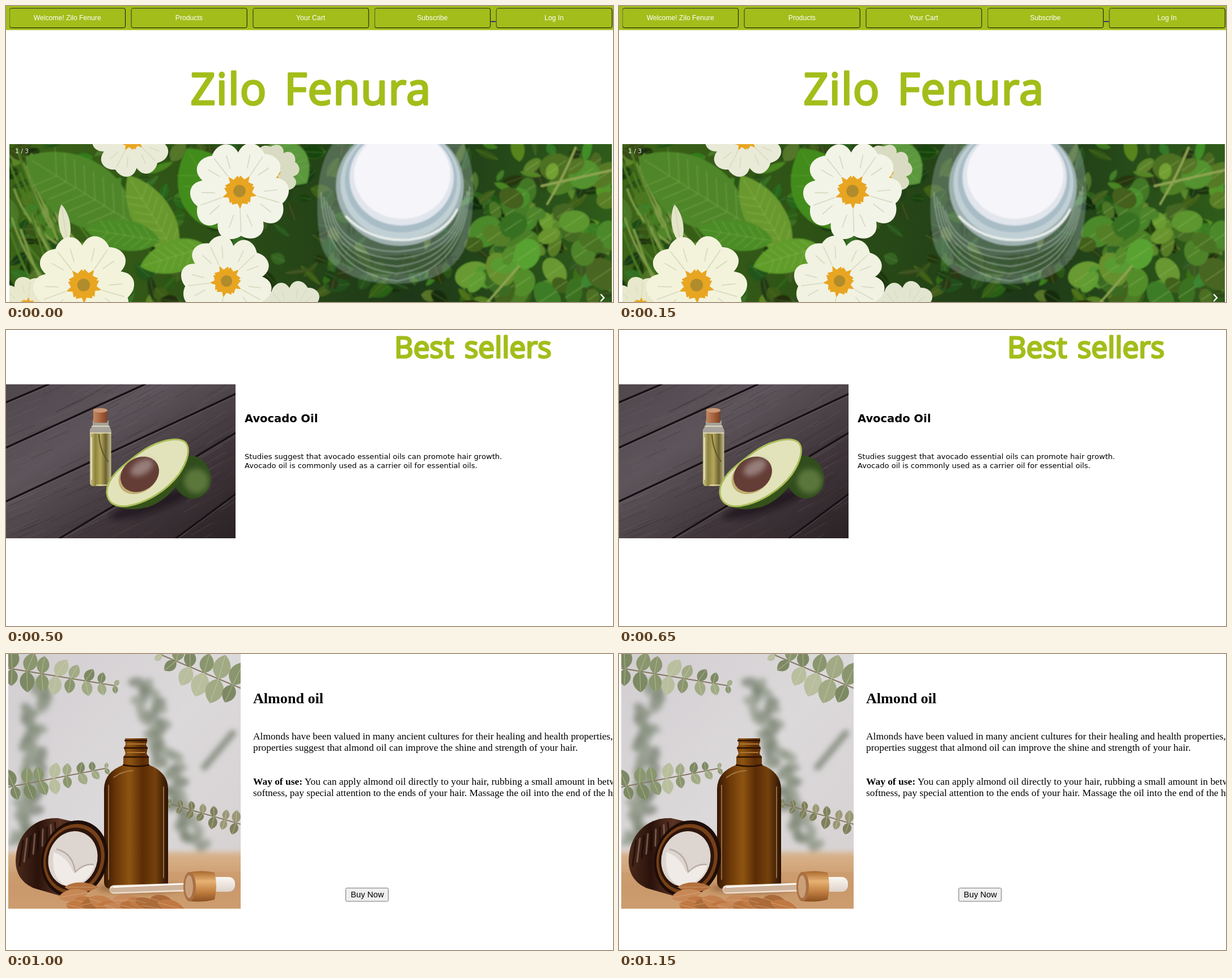
An HTML page that plays this animation: 1071 by 523 pixels, repeating every 1.25 s.

```html
<!DOCTYPE html>
<html lang="en">
<head>
<meta charset="utf-8">
<title>Shop tour</title>
<style>
html, body { margin: 0; width: 100%; height: 100%; overflow: hidden; background: #fff; }
#stage { display: block; width: 1071px; height: 523px; }
.sans { font-family: "Liberation Sans", Arial, sans-serif; }
.wide { font-family: "DejaVu Sans", Verdana, sans-serif; font-size: 13.1px; }
.serif { font-family: "Liberation Serif", "Times New Roman", serif; font-size: 17.4px; }
.brand { font-family: "Open Sans", sans-serif; fill: #a3bd1a; stroke: #a3bd1a; stroke-linejoin: round; text-anchor: middle; }
.mid { text-anchor: middle; }
</style>
</head>
<body>
<svg id="stage" viewBox="0 0 1071 523">
  <defs>
    <filter id="soft" x="-20%" y="-20%" width="140%" height="140%"><feGaussianBlur stdDeviation="1"/></filter>
    <filter id="blur" x="-50%" y="-50%" width="200%" height="200%"><feGaussianBlur stdDeviation="5"/></filter>
    <filter id="haze" x="-100%" y="-100%" width="300%" height="300%"><feGaussianBlur stdDeviation="30"/></filter>
  </defs>
</svg>
<script>
const stage = document.getElementById('stage');
const defs = stage.querySelector('defs');
const HOLD = 250, TAU = Math.PI * 2;

function el(parent, tag, attrs = {}, text) {
  const node = document.createElementNS('http://www.w3.org/2000/svg', tag);
  for (const k in attrs) node.setAttribute(k, attrs[k]);
  if (text) node.textContent = text;
  return parent.appendChild(node);
}
const rect = (g, x, y, width, height, fill, more) => el(g, 'rect', { x, y, width, height, fill, ...more });
const oval = (g, cx, cy, rx, ry, fill, turn = 0, more) =>
  el(g, 'ellipse', { cx, cy, rx, ry, fill, transform: `rotate(${turn} ${cx} ${cy})`, ...more });
const shape = (g, d, fill, more) => el(g, 'path', { d, fill, ...more });
const line = (g, d, stroke, width, more) =>
  el(g, 'path', { d, fill: 'none', stroke, 'stroke-width': width, 'stroke-linecap': 'round', ...more });
const label = (g, x, y, text, cls, more) => el(g, 'text', { x, y, class: cls, ...more }, text);
const group = (g, more) => el(g, 'g', more);
const blurred = (g, id) => group(g, { filter: `url(#${id})` });

let ids = 0;
function gradient(colors, dx = 1, dy = 0) {
  const id = 'g' + ids++;
  const lg = el(defs, 'linearGradient', { id, x2: dx, y2: dy });
  colors.forEach((c, i) => el(lg, 'stop', { offset: i / (colors.length - 1), 'stop-color': c }));
  return `url(#${id})`;
}

// Seeded generator of numbers between a and b
function random(seed) {
  return (a = 0, b = 1) => {
    seed = (seed * 1664525 + 1013904223) >>> 0;
    return a + (b - a) * seed / 4294967296;
  };
}

// A box in stage coordinates that clips what is drawn in it
function photo(g, x, y, width, height, fill) {
  const box = el(g, 'svg', { x, y, width, height, viewBox: [x, y, width, height].join(' ') });
  rect(box, x, y, width, height, fill);
  return box;
}

// Leaf growing from x, y at an angle in radians
function leaf(g, x, y, angle, len, w, fill, vein, sides = 0) {
  const c = w * 0.667;
  const f = group(g, { transform: `translate(${x} ${y}) rotate(${angle * 360 / TAU})` });
  shape(f, `M0 0C${len * 0.2} ${c} ${len * 0.72} ${c} ${len} 0C${len * 0.72} ${-c} ${len * 0.2} ${-c} 0 0`, fill);
  if (!vein) return;
  let d = `M0 0H${len * 0.94}`;
  for (let i = 1; i <= sides; i++) {
    const t = i / (sides + 1) * 0.8 * len, tip = t + len * 0.13;
    d += `M${tip} ${w * 0.36}L${t} 0L${tip} ${-w * 0.36}`;
  }
  line(f, d, vein, 1, { opacity: 0.6 });
}

// Stem from tip to base with leaf pairs that open from the tip down
function branch(g, [x1, y1], [x2, y2], o) {
  const rnd = random(o.n * 7), cx = (x1 + x2) / 2 + o.bend, cy = (y1 + y2) / 2;
  const up = Math.atan2(y1 - y2, x1 - x2);
  line(g, `M${x1} ${y1}Q${cx} ${cy} ${x2} ${y2}`, o.stem, o.thick || 2);
  for (let i = 0; i < o.n; i++) {
    const t = i / o.n, s = 1 - t;
    const x = s * s * x1 + 2 * s * t * cx + t * t * x2, y = s * s * y1 + 2 * s * t * cy + t * t * y2;
    const len = o.small + (o.large - o.small) * Math.sin(Math.min(1, t * 1.7) * Math.PI / 2);
    for (const side of [-1, 1]) {
      const size = len * rnd(0.8, 1.1), turn = o.open + o.fold * t + rnd(-0.25, 0.25);
      leaf(g, x, y, up + side * turn, size, size * o.wide, o.fills[Math.floor(rnd(0, o.fills.length))], o.vein, o.sides);
    }
  }
}

function primrose(g, x, y, r, turn, shade) {
  const f = group(g, { transform: `translate(${x} ${y}) rotate(${turn}) scale(${r})` });
  const each = draw => [0, 72, 144, 216, 288].forEach(a => draw(group(f, { transform: `rotate(${a})` })));
  each(p => {
    shape(p, 'M.06 0C.22 -.12 .4 -.52 .78 -.48C1 -.45 1.07 -.2 .94 0C1.07 .2 1 .45 .78 .48C.4 .52 .22 .12 .06 0', shade);
    line(p, 'M.4 0H.86M.5 -.14L.75 -.24M.5 .14L.75 .24', '#d6d9bf', 0.02);
  });
  each(p => shape(p, 'M0 -.14L.28 -.17L.26 -.05L.38 0L.26 .05L.28 .17L0 .14', '#e8a521'));
  oval(f, 0, 0, 0.13, 0.13, '#b08c2c');
}

function title(g, x, y) {
  label(g, x, y, 'Zilo Fenura', 'brand', { 'font-size': 77, 'stroke-width': 3.5, 'letter-spacing': 1.5, 'word-spacing': 9 });
}
const counter = (g, x, y, text) => label(g, x, y, text, 'wide', { style: 'font-size:10.7px', fill: '#f2f2f2' });
const heading = (g, x, y, text) => label(g, x, y, text, 'wide', { style: 'font-size:19.5px', 'font-weight': 700 });

function jar(p) {
  const g = blurred(p, 'soft');
  shape(g, 'M576 244C545 285 546 365 554 415C565 470 630 492 690 491C760 490 808 460 818 400C828 340 829 285 808 244Z', '#9db2b0', { opacity: 0.38 });
  shape(g, 'M575 410Q620 445 695 440Q775 435 805 395Q795 455 735 470Q650 485 595 455Z', '#2a4a20', { opacity: 0.55 });
  for (let i = 0; i < 5; i++)
    line(g, `M${556 + i * 5} ${330 + i * 8}Q${560 + i * 8} ${468 - i * 9} 690 ${486 - i * 13}Q${812 - i * 5} ${464 - i * 9} ${818 - i * 4} ${320 + i * 8}`,
      '#c6d5d0', 2, { opacity: 0.5 });
  ['#9fb1b0', '#c1d0d5', '#a9bdc7', '#e1e5ec', '#f6f5fa'].forEach((c, i) =>
    oval(g, 695 + i, 318 - i * 5, 113 - i * 7, 106 - i * 7, c));
  line(g, 'M600 372Q645 418 712 413Q774 405 796 360', '#e9efed', 4);
}

function home(g) {
  rect(g, 0, 0, 1071, 42.5, '#a3bd1a');
  ['Welcome! Zilo Fenure', 'Products', 'Your Cart', 'Subscribe', 'Log In'].forEach((text, i) => {
    const x = 6.5 + i * 214.7;
    rect(g, x, 4, 204, 34.5, 'none', { rx: 3, stroke: '#111' });
    line(g, `M${x} 36V7Q${x} 4 ${x + 3} 4H${x + 201}`, '#6d7a2c', 1);
    label(g, x + 101.7, 25, text, 'sans mid', { 'font-size': 12.2, fill: '#fff' });
  });
  line(g, 'M856 27.5H863.5', '#0a0a8c', 1.5);
  title(g, 538, 173.5);

  const p = photo(g, 6, 244, 1063, 279, gradient(['#3d6418', '#2c5016', '#1d3818', '#2f5c1a']));
  const rnd = random(11), back = blurred(p, 'soft');
  for (let i = 0; i < 420; i++) {
    const x = rnd(0, 1069), y = rnd(235, 525), edge = Math.abs(x - 540) / 540;
    leaf(back, x, y, rnd(0, TAU), rnd(18, 52), rnd(10, 28),
      `hsl(${rnd(82, 112)} ${rnd(45, 65)}% ${rnd(10, 25 + edge * 15)}%)`, '#5c8b3a');
  }
  for (let i = 0; i < 24; i++) {
    const x = rnd(0, 80), y = rnd(240, 420);
    line(back, `M${x} ${y}q20 60 ${rnd(40, 75)} ${rnd(90, 130)}`, i % 2 ? '#7b9a45' : '#4a7a24', 4);
  }
  for (let i = 0; i < 60; i++) {
    const x = rnd(810, 1069), y = rnd(270, 520), r = rnd(14, 32), fill = `hsl(${rnd(84, 105)} 52% ${rnd(24, 42)}%)`;
    oval(back, x, y, r, r * rnd(0.55, 0.9), fill, rnd(0, 180));
    line(back, `M${x - r * 0.6} ${y + r * 0.4}Q${x} ${y} ${x + r * 0.6} ${y - r * 0.4}`, '#9fc564', 1, { opacity: 0.7 });
  }
  line(back, 'M1005 250Q985 300 955 350M1069 290L945 318M905 460L850 523', '#90a552', 4);

  const big = blurred(p, 'soft');
  leaf(big, 225, 385, 3.7, 225, 115, '#4f862a', '#8fb655', 8);
  leaf(big, 300, 440, 4.17, 165, 70, '#69992f', '#9abd5c', 7);
  leaf(big, 400, 395, 4.2, 165, 110, '#438c1d', '#6fa83a', 5);
  leaf(big, 272, 415, 3.3, 135, 54, '#4b8c25', '#8bb550', 6);
  leaf(big, 465, 245, 0.8, 95, 74, '#5b983e', '#8ab965', 5);
  leaf(big, 355, 425, 2.85, 124, 58, '#5f9c2b', '#9abd5c', 6);

  jar(p);
  primrose(p, 222, 232, 68, 45, '#e9ead7');
  primrose(p, 470, 292, 46, 50, '#d9dcc2');
  primrose(p, 38, 535, 55, -85, '#e8e9cc');
  primrose(p, 505, 545, 58, -60, '#e2e5d0');
  leaf(p, 108, 418, -1.72, 68, 20, '#e3e5c8', '#c2c79e');
  primrose(p, 137, 493, 86, -128, '#f3f3dc');
  primrose(p, 412, 327, 84, -56, '#f3f4e8');
  primrose(p, 389, 486, 78, -115, '#f1f2e2');
  counter(g, 16, 260, '1 / 3');
  line(g, 'M1050 510L1055 515.5L1050 521', '#fff', 2.5);
}

function herbs(g) {
  title(g, 534, 146.5);
  const p = photo(g, 2, 217, 1063, 306, gradient(['#c3c3a0', '#bdc095', '#dbe79f', '#c6d970', '#bcd05a']));
  const far = blurred(p, 'haze');
  const glow = (x, y, r, c) => oval(far, x, y, r * 1.5, r, c);
  glow(270, 265, 55, '#bdb9aa');
  glow(320, 330, 35, '#969a6c');
  glow(345, 460, 40, '#66822f');
  glow(490, 300, 70, '#e4eeb4');
  glow(820, 360, 60, '#a6c03c');
  glow(870, 240, 40, '#d9e68c');
  glow(1075, 340, 45, '#175a2c');

  const roll = blurred(p, 'soft');
  shape(roll, 'M0 402C80 396 170 398 215 408C270 412 318 455 329 523H0Z', gradient(['#f6f2d6', '#f1e9c6', '#dcc288', '#ad772a'], 0, 1));
  shape(roll, 'M212 523C205 470 232 447 262 448C300 452 318 485 322 523Z', '#e9e0b4');
  line(roll, 'M212 520C208 470 240 448 270 454C302 466 308 495 306 523M232 523C230 490 250 470 272 478C290 488 290 505 286 523M250 500Q265 490 278 500', '#c0a85c', 4);
  line(roll, 'M5 408Q150 398 215 412Q280 418 312 475', '#fbf8e4', 7, { opacity: 0.8 });
  oval(roll, 438, 520, 23, 14, '#f3f4e2');

  const sprout = { stem: '#8f9d40', thick: 4, bend: -8, wide: 0.42, vein: '#cfe0b4', sides: 4 };
  const young = ['#b5c935', '#a5bd3a'], deep = ['#2f5a2a', '#47752f', '#5f8c3c', '#264f2c'];
  for (const side of [0, 1]) leaf(p, 578 + side * 115, 475, side ? 0.7 : 2.4, 58, 24, young[side], '#e2eb9a');
  branch(p, [700, 375], [670, 450], { ...sprout, n: 2, small: 55, large: 60, open: 1, fold: 0.6, fills: young });
  branch(p, [690, 372], [660, 500], { ...sprout, n: 5, small: 26, large: 82, open: 0.4, fold: 1.7, fills: [...deep, '#9ab680'] });
  branch(p, [538, 250], [610, 500], { ...sprout, n: 9, small: 17, large: 80, open: 0.5, fold: 2, fills: [...deep, '#7f9f5c'] });
  leaf(p, 636, 455, 1.6, 75, 48, '#4f7d2c', '#a8c070', 5);
  rect(p, 574, 486, 130, 45, '#e9eedb', { opacity: 0.4, rx: 8 });
  line(p, 'M575 487Q640 478 703 487M577 503Q640 496 702 503M580 490V523M590 505V523M698 490V523', '#f5f8e9', 3, { opacity: 0.8 });
  counter(g, 12, 233, '2 / 3');
  line(g, 'M22 517L16.5 524L22 531M1046 517L1051.5 524L1046 531', '#fff', 2.5);
}

function avocado(g) {
  label(g, 824, 49, 'Best sellers', 'brand', { 'font-size': 51.5, 'stroke-width': 3, 'word-spacing': 5 });
  const p = photo(g, 0, 96, 405, 272, gradient(['#4e474c', '#5d555b', '#40363b', '#2b2226'], 1, 1));
  const rnd = random(5);
  for (let i = 0; i < 240; i++) {
    const x = rnd(-30, 390), len = rnd(20, 80);
    line(p, `M${x} ${rnd(90, 380)}l${len} ${-len * (0.42 + x * 0.0005)}`, ['#7b7279', '#241c20', '#6b4d43'][i % 3], 1, { opacity: 0.3 });
  }
  const seams = 'M0 128L75 96M0 208L245 96M0 303L405 113M95 368L405 182M300 368L405 290';
  line(p, seams, '#171114', 3.5);
  line(p, seams, '#84767a', 0.8, { opacity: 0.6, transform: 'translate(0 3)' });

  oval(p, 255, 308, 75, 14, '#171013', -18, { opacity: 0.6, filter: 'url(#blur)' });
  rect(p, 148, 172, 37.5, 104, gradient(['#d2c892', '#8d833e', '#b5a85b', '#6c6130', '#c5bf8f']), { rx: 6 });
  shape(p, 'M153 160H181V168Q185 173 185.5 181H148Q149 173 153 168Z', '#a6a29b');
  line(p, 'M149 182H185M152 170H182M151 190V264M160 274H178', '#eee9c8', 1.6);
  line(p, 'M164 185Q166 215 180 232', '#5e5230', 2);
  rect(p, 154, 139, 25, 25, gradient(['#c48961', '#a6623f', '#794128']), { rx: 3 });
  oval(p, 166.5, 142, 12.5, 4, '#cb9876');

  oval(p, 328, 260, 33, 38, '#314d1d', -12);
  oval(p, 336, 267, 22, 22, '#6e884a', 0, { opacity: 0.7, filter: 'url(#blur)' });
  shape(p, 'M178 285C178 315 215 322 250 313C295 298 325 250 322 208Z', '#36521b');
  shape(p, 'M178 288C176 262 205 240 235 218C262 197 300 187 316 198C326 208 322 230 305 255C285 282 250 305 215 311C190 314 179 303 178 288Z',
    '#e2e3ba', { stroke: '#aabd58', 'stroke-width': 3 });
  oval(p, 234, 258, 38, 29, '#c2ad70', -34);
  oval(p, 236, 255, 36, 29, '#633d36', -34);
  oval(p, 240, 243, 22, 12, '#a99492', -30, { opacity: 0.75, filter: 'url(#blur)' });

  heading(g, 421, 163, 'Avocado Oil');
  label(g, 421, 228, 'Studies suggest that avocado essential oils can promote hair growth.', 'wide');
  label(g, 421, 244, 'Avocado oil is commonly used as a carrier oil for essential oils.', 'wide');
}

function olive(g) {
  const p = photo(g, 0, 8, 409, 273, gradient(['#dededf', '#e6e7e9', '#e9eaec', '#d9dadc'], 1, 1));
  const rnd = random(21);
  const foliage = (x, y, angle) => leaf(p, x, y, angle, 56, 28, '#33642a', '#86a866', 4);
  foliage(12, 17, 1.1);
  foliage(192, 36, -0.7);
  foliage(193, 110, 0.93);
  foliage(103, 133, 1.6);
  foliage(14, 233, 0.9);
  foliage(196, 234, 2.18);
  foliage(-12, 75, 1.2);
  for (let i = 0; i < 16; i++) {
    const a = i / 16 * TAU;
    oval(p, 125 + Math.cos(a) * rnd(85, 115), 120 + Math.sin(a) * rnd(95, 150), 2.4, 2.4, '#4b3c36');
  }

  oval(p, 146, 92, 48, 46, '#8d8d90', 0, { opacity: 0.5, filter: 'url(#blur)' });
  oval(p, 142.5, 85, 47.5, 47.5, '#8b432d');
  oval(p, 142.5, 85, 43, 43, '#2a2019');
  for (let i = 0; i < 24; i++) {
    const a = i * 2.4, r = 36 * Math.sqrt(i / 24), x = 142 + r * Math.cos(a), y = 85 + r * Math.sin(a);
    const black = x > 140 && i % 3 === 0;
    oval(p, x, y, 9, 8, black ? '#25262c' : `hsl(47 62% ${rnd(38, 50)}%)`, i * 40);
    if (!black) oval(p, x - 2, y - 3, 3, 2, '#e3cf78');
  }

  const handle = 'M42 76Q18 68 19 90Q20 104 28 112';
  line(p, handle, '#c9cacc', 6);
  line(p, handle, '#f5f5f5', 2.5);
  oval(p, 60, 55, 15, 13, '#d5d7d9', -35);
  oval(p, 57, 51, 8, 6, '#f4f4f5', -35);
  shape(p, 'M42 70H63L64 96Q79 115 79 145Q77 165 47 165Q15 164 14 147Q16 112 39 100Z', '#d9d4c8');
  shape(p, 'M40 100H65Q78 118 78 146Q76 163 47 164Q16 163 15 146Q18 111 40 100Z', gradient(['#cc8618', '#e3a63a', '#bd6f0d', '#d18b22']));
  oval(p, 46, 145, 20, 17, '#f0cc86', 0, { opacity: 0.7, filter: 'url(#blur)' });
  line(p, 'M46 74V96M57 74L59 96M27 150Q46 162 68 150', '#f6eedc', 2);

  const b = group(p, { transform: 'translate(179 157) rotate(40)' });
  rect(b, -13, -7, 27, 17, '#dfb78f', { rx: 2 });
  rect(b, -10, 9, 21, 16, '#d6bd94', { rx: 2 });
  shape(b, 'M-10 22H11Q13 34 26 42Q29 46 28 54V113Q27 121 20 121H-20Q-27 121-27 113V54Q-27 46-23 42Q-12 34-10 22Z',
    gradient(['#a49038', '#7f6410', '#9b7d1e', '#735806', '#b39c4b']));
  line(b, 'M-23 52V112M23 52V112M-22 116H22M-18 44Q0 36 18 44', '#d7c582', 2);

  heading(g, 425, 123, 'Olive Oil');
  label(g, 425, 156, 'Olive oil moisturizes your hair and reduces scalp irritation, which further reduces dandruff.', 'wide');
}

function almond(g) {
  const p = photo(g, 4, 0, 410, 450, gradient(['#d2ced1', '#dcd9db', '#d5d0d0'], 1, 1));
  const far = blurred(p, 'blur'), rnd = random(8);
  for (let i = 0; i < 90; i++) {
    const t = i / 90, x = i % 2 ? 60 - 30 * t : 240 + 95 * t;
    oval(far, x + rnd(-18, 18), 50 + t * 295, 15, 9, i % 3 ? '#929a8a' : '#7a8373', rnd(0, 180), { opacity: 0.75 });
  }
  line(far, 'M400 140L350 200', '#8f9589', 12);
  rect(far, -20, 350, 460, 120, gradient(['#d9b48d', '#c99666', '#d3a679'], 0, 1));
  rect(p, 4, 385, 410, 65, '#cc9b6e', { opacity: 0.6 });

  const sage = {
    stem: '#857a5f', bend: 0, open: 1.2, fold: 0.4, wide: 0.7, vein: '#cbd0b4',
    fills: ['#a1aa85', '#8a966e', '#b9bf9e', '#7d8963']
  };
  branch(p, [192, 56], [-15, 22], { ...sage, n: 8, small: 14, large: 36 });
  branch(p, [275, 2], [425, 65], { ...sage, n: 6, small: 18, large: 42 });
  branch(p, [176, 202], [-10, 238], { ...sage, n: 8, small: 12, large: 30 });
  branch(p, [290, 265], [425, 304], { ...sage, n: 7, small: 10, large: 22, fills: ['#7f805c', '#9a9877'] });

  const amber = gradient(['#351704', '#6c3808', '#8d5412', '#5c2c05', '#74410d', '#2b1203']);
  oval(p, 235, 414, 75, 8, '#754820', 0, { opacity: 0.6, filter: 'url(#blur)' });
  shape(p, 'M210 149H249V155L247 160L250 166L248 176L252 182V196Q285 208 286 238V402Q286 415 273 415H186Q173 415 173 402V238Q174 208 207 196V182L211 176L208 166L211 160Z', amber);
  line(p, 'M210 153H248M209 166H249M209 182H251M207 196Q230 201 252 196', '#2b1103', 2.5);
  line(p, 'M214 159H245M214 174H245', '#b27633', 2);
  line(p, 'M181 232V398M278 235V395M190 218Q205 207 224 206', '#b58a58', 2, { opacity: 0.7 });

  shape(p, 'M92 290C50 288 18 318 17 365C17 390 30 406 50 414L105 430L135 300Z', gradient(['#4a2a1c', '#2a120b', '#5b3425', '#241009']));
  for (let i = 0; i < 9; i++)
    line(p, `M${30 + i * 7} ${330 - i * 4}l${-6 + i} ${44 - i * 3}`, i % 2 ? '#8c6d5f' : '#180a06', 3, { opacity: 0.7 });
  ['#1e0d08', '#774018', '#2d150b', '#ddd5cf'].forEach((c, i) => oval(p, 121 - i, 362, 58 - i * 5, 69 - i * 6.5, c, 18));
  shape(p, 'M84 350Q110 360 118 385Q135 370 156 372Q148 405 110 411Q78 400 84 350Z', '#f0ebe6');
  line(p, 'M90 345Q118 352 122 385Q138 370 154 372', '#b9aca5', 2.5);

  line(p, 'M190 416L316 412', '#efe2d4', 15);
  line(p, 'M188 417L318 412', '#b78f70', 9, { opacity: 0.55 });
  line(p, 'M190 412L314 406', '#fff', 2);
  rect(p, 355, 394, 49, 26, gradient(['#fbf7f3', '#ddd3ca'], 0, 1), { rx: 11 });
  shape(p, 'M320 386Q345 381 368 386Q374 410 368 434Q345 440 320 436Z', gradient(['#a8682e', '#e6b273', '#c28142', '#8b5020'], 0, 1));
  oval(p, 324, 411, 11, 26, '#a97043');
  oval(p, 323, 411, 7, 20, '#caa07b');

  leaf(p, 104, 412, 0, 58, 17, '#b3713d', '#e0b284');
  for (let i = 0; i < 14; i++)
    leaf(p, 92 + i * 13.5, 436 + rnd(-6, 10), rnd(-0.35, 0.35), rnd(44, 56), rnd(18, 24), `hsl(26 50% ${rnd(44, 57)}%)`, '#e0b284');

  label(g, 436, 87, 'Almond oil', 'serif', { style: 'font-size:26.1px', 'font-weight': 700 });
  label(g, 436, 151, 'Almonds have been valued in many ancient cultures for their healing and health properties,', 'serif');
  label(g, 436, 171, 'properties suggest that almond oil can improve the shine and strength of your hair.', 'serif');
  const use = label(g, 436, 231, '', 'serif');
  el(use, 'tspan', { 'font-weight': 700 }, 'Way of use:');
  el(use, 'tspan', {}, ' You can apply almond oil directly to your hair, rubbing a small amount in between');
  label(g, 436, 251, 'softness, pay special attention to the ends of your hair. Massage the oil into the end of the hair', 'serif');
  rect(g, 599.5, 413.5, 75, 23.5, '#efefef', { rx: 2, stroke: '#767676' });
  label(g, 637.5, 430, 'Buy Now', 'sans mid', { 'font-size': 14.6 });
}

const scenes = [home, herbs, avocado, olive, almond].map(draw => {
  const g = group(stage);
  draw(g);
  return g;
});

function show(time) {
  const now = Math.floor(time / HOLD) % scenes.length;
  scenes.forEach((g, i) => g.setAttribute('visibility', i === now ? 'visible' : 'hidden'));
}

const start = performance.now();
function tick() {
  show(performance.now() - start);
  requestAnimationFrame(tick);
}
show(0);
requestAnimationFrame(tick);
</script>
</body>
</html>
```
